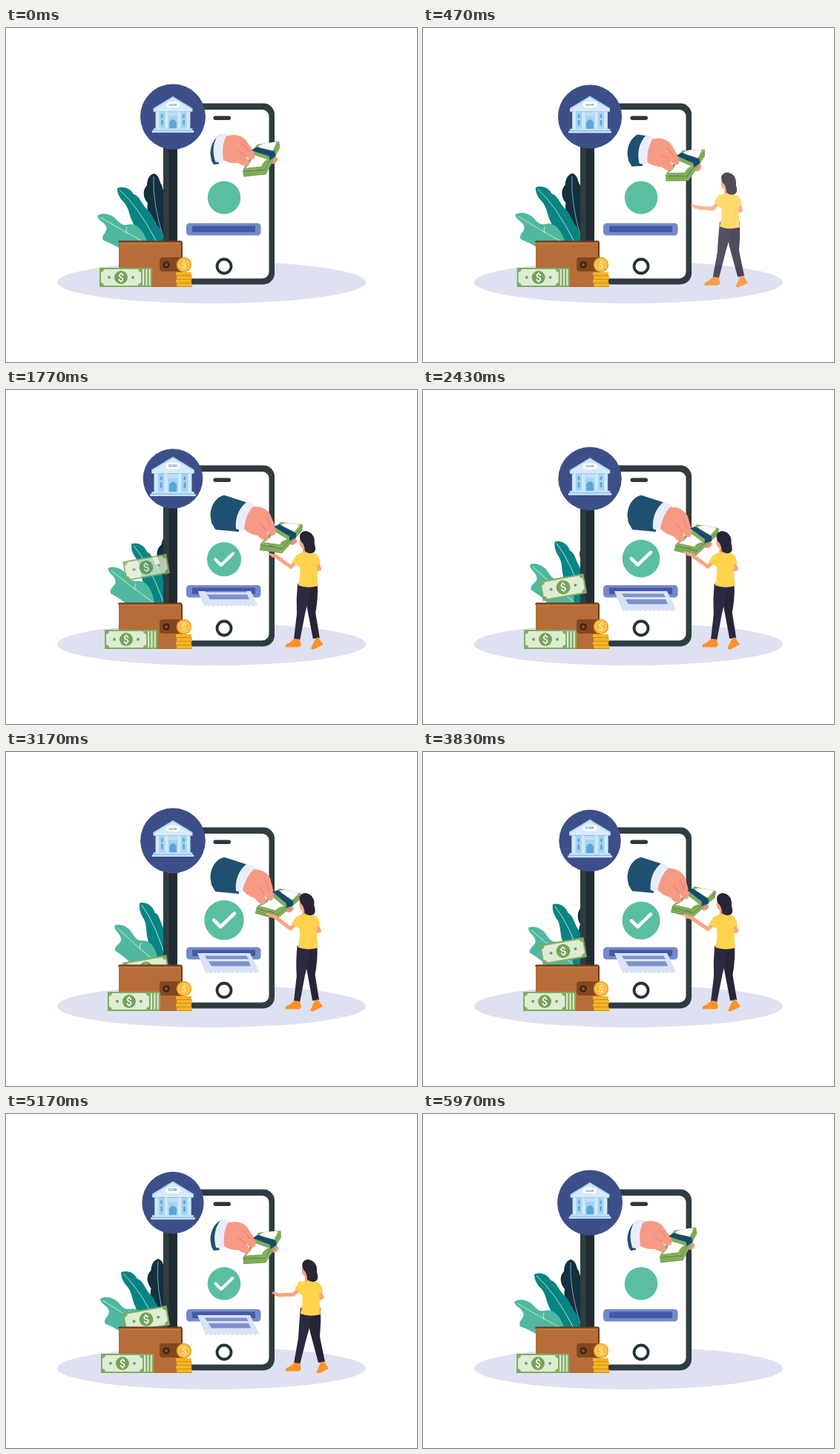
Animation of 554x450 px, one loop 6.01 s. Source, as an HTML page:

```html
<!DOCTYPE html>
<html lang="en">
<head>
<meta charset="utf-8">
<title>Mobile banking</title>
<style>
html, body { margin: 0; width: 100%; height: 100%; overflow: hidden; background: #fff; }
svg { display: block; width: 554px; height: 450px; }
text { font-family: Roboto, Arial, sans-serif; text-anchor: middle; }
</style>
</head>
<body>
<svg viewBox="0 0 554 450">
  <defs>
    <clipPath id="sleeveHole"><path d="M420 120H310L296 141.500C283 143 275.500 156 275.500 170L277 179 282 187.500 320 240H420z"/></clipPath>
    <clipPath id="paperSlot"><rect x="240" y="271" width="110" height="35"/></clipPath>
    <g id="note">
      <rect x="-29" y="-13" width="58" height="26" fill="#81ab66"/>
      <path d="M-23-11H23Q23-8 27-7V7Q23 8 23 11H-23Q-23 8-27 7V-7Q-23-8-23-11z" fill="#deecd3"/>
      <circle r="9" fill="#75a35b"/>
      <circle cx="-16" r="1.900" fill="#75a35b"/><circle cx="16" r="1.900" fill="#75a35b"/>
      <text y="5" font-size="14" font-weight="500" fill="#fff">$</text>
    </g>
  </defs>

  <ellipse cx="277" cy="342.500" rx="208" ry="28.500" fill="#dde1f1"/>

  <g id="leaves">
    <path fill="#12303f" d="M199 196C207 198 206 206 210 212C214 222 212 230 216 240V310H208C204 276 206 264 197 256C190 250 190 242 191 236C184 228 184 218 190 212C190 204 193 198 199 196z"/>
    <path d="M199 200Q197 235 213 286" fill="none" stroke="#a9c0c5" stroke-width=".8"/>
    <path fill="#078583" d="M150 216C158 212 168 216 172 224C180 226 182 236 190 244C198 250 198 260 206 268C212 276 212 284 214 310H190C176 282 174 268 170 260C166 252 166 244 160 236C154 230 150 224 150 216z"/>
    <path d="M153 218Q178 240 203 288" fill="none" stroke="#c5e2df" stroke-width=".9"/>
    <path fill="#4fb89f" d="M196 312C190 272 176 261 163 265C152 267 150 255 140 252C134 249 126 250 123 253C124 260 133 261 135 268C138 275 127 279 131 286C146 292 160 298 166 312z"/>
    <path d="M127 255Q155 272 189 290M163 268Q161 272 163 277" fill="none" stroke="#d4ece5" stroke-width=".9"/>
  </g>

  <rect x="212" y="101.500" width="150" height="244" rx="15" fill="#2f3c40"/>
  <path d="M225 112V338" stroke="#202c31" stroke-width="11"/>
  <rect x="231" y="110" width="123.500" height="227.500" rx="9" fill="#fff"/>
  <rect x="279.500" y="118.500" width="23.500" height="5.500" rx="2.700" fill="#2b373c"/>
  <circle cx="294" cy="321" r="9.500" fill="#fff" stroke="#263338" stroke-width="3.800"/>

  <g id="status">
    <circle r="22.300" fill="#5abfa0"/>
    <path id="check" d="M-11.500 0L-4 7.500L11.500-7.500" fill="none" stroke="#fff" stroke-width="4" stroke-linecap="round" stroke-linejoin="round" pathLength="100"/>
  </g>

  <rect x="243" y="263" width="100.500" height="16.500" rx="4.500" fill="#7489c8"/>
  <rect x="251" y="266.500" width="85" height="8.500" rx="1" fill="#4658a8"/>
  <g clip-path="url(#paperSlot)"><g id="paper">
    <path d="M258 271H329L341.500 297l-3-1-3 2.500-3-2.500-3 2.500-3-2.500-3 2.500-3-2.500-3 2.500-3-2.500-3 2.500-3-2.500-3 2.500-3-2.500-3 2.500-3-2.500-3 2.500-3-2.500-3 2.500-3-2.500-3 2.500-3-2.500-3 2.500-3-2.500-3 2.500z" fill="#dae2f6"/>
    <path d="M268 274.500H324L327 279H271zM273 282H327L330 288.500H277z" fill="#7d91cb"/>
  </g></g>

  <g clip-path="url(#sleeveHole)"><g id="sleeve">
    <path d="M230 118L292 141L326 152Q314 168 314 191L281 188L220 176z" fill="#205071"/>
    <path d="M324 151Q332 152 338 158L323 189Q316 190 310 187Q308 165 324 151z" fill="#e9edfa"/>
  </g></g>
  <g id="hand">
    <path d="M376 205L391 200Q395 206 386 209z" fill="#f4937f"/>
    <path d="M343 207L372 212L400 181L399 190L372 220L342 216z" fill="#6d9b48"/>
    <path d="M343 211L372 216L399 186M343 214L372 218L399 189" fill="none" stroke="#a8c783" stroke-width=".8"/>
    <path d="M343 207L370 178L400 181L372 212z" fill="#82ad5c"/>
    <path d="M347 205Q357 201 361 190L379 201Q371 203 369 208zM371 181Q378 178 386 180Q395 180 396 182L389 191L374 184z" fill="#fff"/>
    <path d="M332 157.500C343 156 351 160 356 167L362 182Q366 193 361 196Q356 197 351 189Q356 199 353 202Q346 204 339 196Q327 194 321 187Q323 168 332 157.500z" fill="#f69a86"/>
    <path d="M341 179Q347 184 351 190M349 171Q355 177 357 185" fill="none" stroke="#e77e70" stroke-width="1"/>
    <path d="M361 184L368 181L391 193V199L382 203V197z" fill="#174a6c"/>
  </g>

  <g id="badge"><circle r="42" fill="#3c4f88"/></g>
  <g id="bank">
    <path d="M-28-8L0-25L28-8V-4H-28z" fill="#d5eafb"/>
    <path d="M-28-8L0-25L28-8" fill="none" stroke="#a9d2f2" stroke-width="1.800"/>
    <rect x="-25" y="-4" width="50" height="25" fill="#a5d3f2"/>
    <path d="M-22-4V20M-9-4V20M9-4V20M22-4V20" stroke="#d3eafb" stroke-width="4.500"/>
    <path d="M-15.500 0V5M15.500 0V5M-15.500 8V15M15.500 8V15" stroke="#5ba5d8" stroke-width="2.600"/>
    <path d="M-5 21V11Q0 3 5 11V21z" fill="#5ba5d8"/>
    <rect x="-8" y="-3" width="16" height="5" fill="#bde0f7"/>
    <path d="M-28 20H28V23H30V26H-30V23H-28z" fill="#c5e3f8"/>
    <path d="M-28 23H28" stroke="#78b6e2" stroke-width="1"/>
    <rect x="-10" y="-18" width="20" height="8" rx="4" fill="#fff"/>
    <text y="-12.500" font-size="4.500" font-weight="700" fill="#7a9cc0">BANK</text>
  </g>

  <use id="flyingNote" href="#note"/>

  <rect x="152" y="287" width="85.500" height="62" rx="2" fill="#b66d38"/>
  <path d="M152 289Q152 287 155 287.500H235Q237 287 237 291V349" fill="none" stroke="#67361b" stroke-width="1.800"/>
  <path d="M155 290.500H233" stroke="#cf8950" stroke-width=".7"/>
  <path d="M237 309H211Q207 309 207 313V324Q207 328 211 328H237z" fill="#824720"/>
  <circle cx="216" cy="319" r="4.800" fill="#472513"/><circle cx="216" cy="319" r="2" fill="#8f562c"/>
  <g id="coins"></g>
  <circle cx="240" cy="319" r="10.200" fill="#eeaa25"/>
  <circle cx="240" cy="319" r="7.500" fill="#f5bd43" stroke="#ffd678"/>
  <text x="240" y="323.500" font-size="12" fill="#fff0b8">$</text>

  <g id="stack"><g id="stackBacks"></g><use href="#note"/></g>

  <g id="woman">
    <path id="backLeg" fill="#282438"/><path id="frontLeg" fill="#2c2940"/>
    <path d="M389 335l7 1 2 8-3 2.500h-18q-2-4 5-6z" fill="#ff9128"/>
    <path id="backShoe" d="M428 333l7 10-13 6.500-4-1 6-13z" fill="#ff9128"/>
    <g id="torso">
      <path d="M422 232L426 241L417 244" fill="none" stroke="#f9a57e" stroke-width="5" stroke-linejoin="round"/>
      <path d="M399 201Q398 211 403 213V221H412V201z" fill="#f9a57e"/>
      <path d="M401 219L420 220Q426 224 427 234L422 236L424 264Q409 268 397 263Q401 248 399 238L392 234Q394 221 401 219z" fill="#ffd34e"/>
      <path d="M400 194Q405 187 413 192Q420 196 419 207Q422 216 418 219Q412 222 406 217Q406 208 401 204Q398 198 400 194z" fill="#292436"/>
    </g>
    <path id="arm" fill="none" stroke="#f9a57e" stroke-width="5" stroke-linejoin="round" stroke-linecap="round"/>
    <path id="fingers" fill="none" stroke="#f9a57e" stroke-width="3" stroke-linecap="round"/>
    <path id="cuff" fill="none" stroke="#ffd34e" stroke-width="9"/>
  </g>
</svg>
<script>
const LOOP = 6010;
const el = id => document.getElementById(id);
const set = (id, name, value) => el(id).setAttribute(name, value);
const move = (id, value) => set(id, 'transform', value);
const mix = (a, b, u) => a + (b - a) * u;
const ramp = (t, a, b) => Math.max(0, Math.min(1, (t - a) / (b - a)));
const ease = u => u * u * (3 - 2 * u);
const wave = (t, period) => (1 - Math.cos(2 * Math.PI * t / period)) / 2;

// Smooth interpolation that never overshoots its keys.
function track(...keys) {
  const rise = keys.slice(1).map(([t, v], i) => (v - keys[i][1]) / (t - keys[i][0]));
  const slope = keys.map((_, i) => {
    const a = rise[i - 1], b = rise[i];
    return a * b > 0 ? 2 * a * b / (a + b) : 0;
  });
  return t => {
    if (t <= keys[0][0]) return keys[0][1];
    const j = keys.findIndex(k => k[0] > t);
    if (j < 0) return keys[keys.length - 1][1];
    const [t0, v0] = keys[j - 1], [t1, v1] = keys[j];
    const h = t1 - t0, u = (t - t0) / h, w = 1 - u;
    return v0 * (1 + 2 * u) * w * w + v1 * u * u * (3 - 2 * u)
      + h * u * w * (slope[j - 1] * w - slope[j] * u);
  };
}

const reach = track([0, 0], [930, .78], [1770, 1], [3170, 1], [4430, .7], [5170, .06], [5970, 0]);
const tilt = track([0, -14], [930, -2], [1770, 0], [3170, 8], [4430, 2.5], [5170, -11], [5970, -14]);
const lean = track([0, -.1], [930, 0], [1770, .9], [3000, 1], [3400, 1], [4430, .5], [5170, 0], [5970, -.1]);
const palmX = track([0, 361], [930, 358], [1770, 355], [3170, 352], [4430, 352], [5170, 360], [5970, 362]);
const palmY = track([0, 242], [930, 233], [1770, 221], [3170, 218], [4430, 224], [5170, 241], [5970, 244]);
const noteY = track([900, 236], [1770, 239], [3120, 292], [4400, 251], [5170, 276.5], [5850, 312]);

el('stackBacks').innerHTML = [13, 8.700, 4.400].map(x =>
  `<rect x="${x - 29}" y="-13" width="58" height="26" fill="#81ab66"/>` +
  `<path d="M${x + 25.500}-11V11" stroke="#deecd3" stroke-width="2.500"/>`).join('');
el('coins').innerHTML = [0, 1, 2, 3].map(i =>
  `<rect x="${229 + i % 2}" y="${329 + i * 5}" width="21" height="5" rx="1" fill="#f2b424"/>` +
  `<path d="M${229 + i % 2} ${333.500 + i * 5}h21" stroke="#d18e14"/>`).join('');

function drawWoman(t) {
  const k = lean(t), hip = -4.5 * k, foot = -8 * k;
  const inn = ease(ramp(t, 0, 650)), out = ease(ramp(t, 5250, 5930));
  const shown = inn * (1 - out), away = 1 - shown;
  const x = palmX(t), y = palmY(t), bow = Math.max(0, .75 * (y - 233));
  set('woman', 'opacity', shown);
  move('woman', `translate(${14 * away} ${away})`);
  move('torso', `translate(${.8 * hip} ${bow})`);
  move('backShoe', `translate(${foot} 0)`);
  set('frontLeg', 'd', `M${397 + hip} 261Q${395 + hip} 282 ${394 + hip / 2} 302L388 336L396 338L${405 + hip / 2} 302L${416 + hip} 264z`);
  set('backLeg', 'd', `M${404 + hip} 262L${410 + hip} 294L${421 + foot} 335L${430 + foot} 334L${423 + foot * .8} 300Q${425 + hip} 280 ${424 + hip} 261z`);
  const sx = 398 + hip, sy = 229 + bow / 2, ex = 388 + hip, ey = mix(243, 238, k);
  set('arm', 'd', `M${sx} ${sy}L${ex} ${ey}L${x + 9} ${y + 3}`);
  set('fingers', 'd', `M${x + 11} ${y + 3}L${x} ${y}M${x + 9} ${y + 3}L${x + 4} ${y + 3}`);
  set('cuff', 'd', `M${sx + 2} ${sy - 5}L${mix(sx, ex, .5)} ${mix(sy, ey, .5)}`);
}

function draw(t) {
  const sway = wave(t, LOOP), pulse = wave(t, LOOP / 2);
  move('badge', `translate(225 119.500) scale(${mix(44, 40, pulse) / 42})`);
  move('bank', `translate(225 116.500) scale(${mix(.94, 1.03, pulse)})`);
  move('leaves', `rotate(${12 * sway} 225 355)`);
  move('stack', `translate(${155 + 11 * sway} 336)`);

  move('flyingNote', `translate(189 ${noteY(t)}) rotate(-10) scale(1.04)`);
  set('flyingNote', 'opacity', ramp(t, 780, 2000) * (1 - ramp(t, 5800, 5950)));

  const swell = ease(ramp(t, 1300, 3100)) * (1 - ease(ramp(t, 3100, 5200)));
  move('status', `translate(294 ${228.5 - 2 * swell}) scale(${1 + .2 * swell})`);
  const drawn = 100 * ramp(t, 500, 1090) * (1 - ramp(t, 5350, 5900));
  set('check', 'stroke-dasharray', `${drawn} 200`);
  set('check', 'opacity', drawn > 0 ? 1 : 0);

  const printed = ramp(t, 1000, 2000) * (1 - ramp(t, 5300, 5900));
  move('paper', `translate(${-9 * (1 - printed)} ${-28 * (1 - printed)})`);

  const r = reach(t), slide = `translate(${32 * (r - 1)} ${11 * (r - 1)})`;
  move('hand', `${slide} rotate(${tilt(t)} 329 172)`);
  move('sleeve', `${slide} rotate(${Math.min(0, tilt(t))} 329 172)`);
  drawWoman(t);
}

const start = performance.now();
function tick() {
  draw((performance.now() - start) % LOOP);
  requestAnimationFrame(tick);
}
tick();
</script>
</body>
</html>
```
